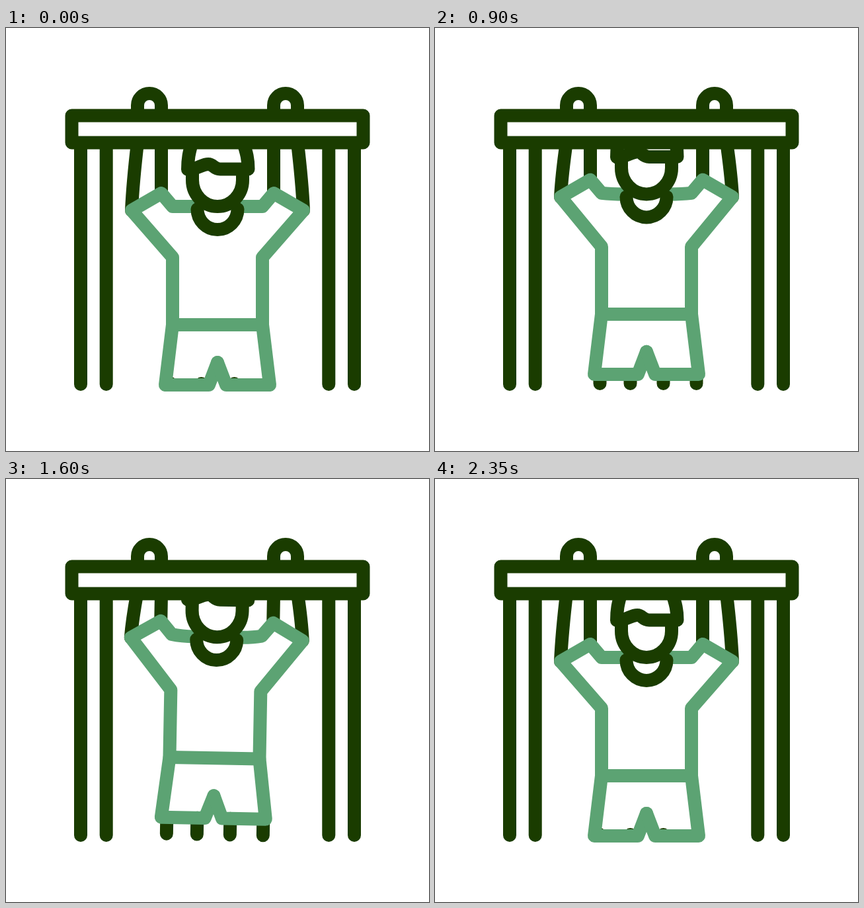
Recreate the animation shown at these times as an HTML page with a canvas. Size 640 px wide and 640 px high, loop 2.4 s.

```html
<!DOCTYPE html>
<html lang="en">
<head>
<meta charset="utf-8">
<title>Pull-ups</title>
<style>
  html, body { margin: 0; width: 100%; height: 100%; overflow: hidden; background: #fff; }
  canvas { display: block; width: 640px; height: 640px; }
</style>
</head>
<body>
<canvas id="stage" width="640" height="640"></canvas>
<script>
const ctx = document.getElementById('stage').getContext('2d');
const DARK = '#1a3c00', GREEN = '#5ca373';
const LOOP = 2400, STEP = 50, CENTER = 320, PIVOT_Y = 175;

// Keys are [time in ms, value], eased in and out between neighbours.
const LIFT = [[0, 0], [570, 1], [640, 1], [1090, 0], [1250, 0], [1850, 1], [1970, 1], [2360, 0], [2400, 0]];
const SWING = [[0, 0], [1200, 0], [1420, 4.4], [1780, -2.3], [2050, 0], [2400, 0]];

function valueAt(keys, time) {
  const i = keys.findIndex(([t]) => t > time);
  const [t0, v0] = keys[i - 1], [t1, v1] = keys[i];
  const eased = (1 - Math.cos(Math.PI * (time - t0) / (t1 - t0))) / 2;
  return v0 + (v1 - v0) * eased;
}

function stroke(path, color, cap = 'round') {
  ctx.strokeStyle = color;
  ctx.lineCap = cap;
  ctx.stroke(new Path2D(path));
}

// Draws once as is and once mirrored about the vertical centre line.
function mirrored(draw) {
  draw();
  ctx.save();
  ctx.translate(2 * CENTER, 0);
  ctx.scale(-1, 1);
  draw();
  ctx.restore();
}

function drawFigure(time) {
  const lift = valueAt(LIFT, time);
  const body = -42.5 * lift, arm = -53.5 * lift, head = -49 * lift;
  const elbow = 276 + arm, notch = 250 + arm, shoulder = 270 + arm, collar = 270 + head;
  const armpit = 347 + body, hip = 449 + body, hem = 540 + body;

  ctx.save();
  ctx.beginPath();
  ctx.rect(0, 172, 640, 468);
  ctx.clip();
  ctx.translate(CENTER, PIVOT_Y);
  ctx.rotate(valueAt(SWING, time) * Math.PI / 180);
  ctx.translate(-CENTER, -PIVOT_Y);

  for (const x of [249.5, 295.5, 345.5, 395.5]) stroke(`M${x} ${Math.min(hem, 538)} V538`, DARK);

  mirrored(() => {
    const bend = 165 + (elbow - 165) * 0.6;
    stroke(`M200 165 Q192 ${bend} 190 ${elbow} M235 155 V${notch}`, DARK);
    stroke(`M287 ${collar} Q266 ${collar} 252 ${shoulder} L235 ${notch} L190 ${elbow}
            L252 ${armpit} V${hip} L241 ${hem} H307 L320 ${506 + body}`, GREEN);
  });
  stroke(`M252 ${hip} H388`, GREEN);

  ctx.translate(0, head);
  stroke('M289.5 274 a30.5 31 0 0 0 61 0', DARK);
  stroke('M282 220 V230 a38 40 0 0 0 76 0 V220', DARK);
  stroke(`M284 165 C276 190 275 200 275 214 C290 214 296 206 306 206
          C314 206 314 213.5 324 213.5 H366.5 C366.5 200 365 190 356 165`, DARK);
  ctx.restore();
}

function drawFrame() {
  mirrored(() => {
    stroke('M113 175 V539 M151.7 175 V539', DARK);
    stroke('M199 126 V117 a18 18 0 0 1 36 0 V126', DARK, 'butt');
  });
  ctx.fillStyle = '#fff';
  ctx.fillRect(99.5, 132.5, 441, 41);
  stroke('M99.5 132.5 H540.5 V173.5 H99.5 Z', DARK);
}

function render(now) {
  const time = Math.floor((now % LOOP) / STEP) * STEP;
  ctx.fillStyle = '#fff';
  ctx.fillRect(0, 0, 640, 640);
  ctx.lineWidth = 20;
  ctx.lineJoin = 'round';
  drawFigure(time);
  drawFrame();
}

const start = performance.now();
function tick() {
  render(performance.now() - start);
  requestAnimationFrame(tick);
}
tick();
</script>
</body>
</html>
```
